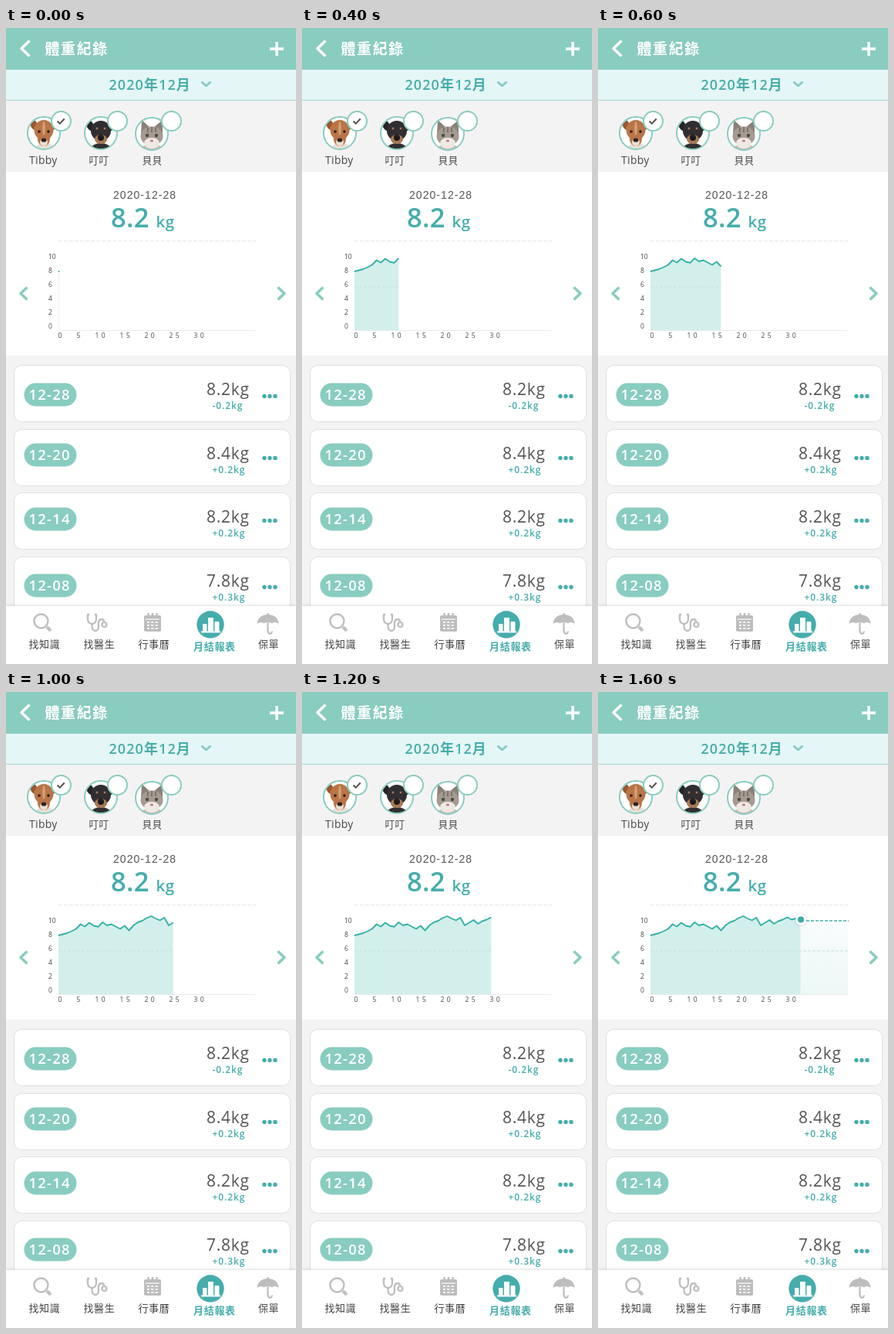
These frames come from a looping animation (376 by 823 pixels, 1.8 s). An HTML page with a canvas:

```html
<!DOCTYPE html>
<html lang="zh-Hant">
<head>
<meta charset="utf-8">
<title>體重紀錄</title>
<style>
html, body { margin: 0; width: 100%; height: 100%; overflow: hidden; background: #fff; }
canvas { display: block; width: 376px; height: 823px; }
</style>
</head>
<body>
<canvas id="stage"></canvas>
<script>
const W = 376, H = 823, LOOP = 1800, STEP = 200;
const MINT = '#89ccc0', TEAL = '#45adab', INK = '#555', GREY = '#bdbdbd', PALE = '#f3f3f3';
const SANS = '"Open Sans", "Noto Sans CJK TC", "Noto Sans CJK", sans-serif';

const canvas = document.getElementById('stage');
const ctx = canvas.getContext('2d');
const ratio = window.devicePixelRatio || 1;
canvas.width = W * ratio;
canvas.height = H * ratio;

// Curve height for each day, and the last day shown at each step
const weights = [315, 313.5, 312, 309.5, 306.5, 300.5, 303.5, 298.5, 302.5, 303.8, 298, 302,
  300.5, 303.5, 306.5, 302.5, 308.5, 302, 298, 296, 292.5, 290, 293, 295.5, 292, 302, 298.5,
  295, 300, 296.5, 294.5, 291.5, 294.5, 293, 294];
const lastDay = [0, 5, 10, 16, 21, 26, 31, 34, 34];
const dayX = day => 68 + day * 5.72;

function text(str, x, y, size, color, spacing = 0, weight = 400, family = SANS) {
  ctx.font = `${weight} ${size}px ${family}`;
  ctx.letterSpacing = spacing + 'px';
  ctx.fillStyle = color;
  ctx.fillText(str, x, y);
}

function rect(x, y, w, h, color) {
  ctx.fillStyle = color;
  ctx.fillRect(x, y, w, h);
}

function paint(fill, stroke, width = 1) {
  if (fill) { ctx.fillStyle = fill; ctx.fill(); }
  if (stroke) { ctx.strokeStyle = stroke; ctx.lineWidth = width; ctx.stroke(); }
}

function round(x, y, w, h, r, fill, stroke, width) {
  ctx.beginPath();
  ctx.roundRect(x, y, w, h, r);
  paint(fill, stroke, width);
}

function oval(x, y, rx, ry, fill, stroke, width, turn = 0) {
  ctx.beginPath();
  ctx.ellipse(x, y, rx, ry, turn, 0, Math.PI * 2);
  paint(fill, stroke, width);
}

const disc = (x, y, r, fill, stroke, width) => oval(x, y, r, r, fill, stroke, width);

function path(d, fill, stroke, width) {
  const shape = new Path2D(d);
  if (fill) { ctx.fillStyle = fill; ctx.fill(shape); }
  if (stroke) { ctx.strokeStyle = stroke; ctx.lineWidth = width; ctx.stroke(shape); }
}

function dashed(x1, x2, y, color, width, dash) {
  ctx.save();
  ctx.setLineDash(dash);
  path(`M${x1} ${y}H${x2}`, null, color, width);
  ctx.restore();
}

function header() {
  rect(0, 0, W, 54, MINT);
  path('M30.5 16.5L20 26.5L30.5 36.5', null, '#fff', 3.6);
  path('M342 27H360M351 18V36', null, '#fff', 3.4);
  text('體重紀錄', 50.5, 33.5, 19, '#fff', 1.6, 600);
  rect(0, 54, W, 39, '#e5f6f6');
  rect(0, 93, W, 1, '#a3d2cb');
  text('2020年12月', 133.5, 80, 18, TEAL, 1.1, 600);
  path('M253.5 69.5L259.5 75L265.5 69.5', null, MINT, 3);
}

function brownDog() {
  oval(51, 157, 13, 8, '#e9dfd6');
  oval(36, 125, 4.5, 8, '#9c5632', null, 0, -0.5);
  oval(62, 125, 4.5, 8, '#9c5632', null, 0, 0.5);
  oval(49, 132, 12.5, 13, '#b97546');
  oval(49, 144, 8, 9, '#b97546');
  oval(49, 148, 5, 5, '#eadccf');
  oval(49, 130, 1.8, 9, '#d3a075');
  disc(43, 134, 1.8, '#2b1a13');
  disc(55, 134, 1.8, '#2b1a13');
  oval(49, 145, 3.4, 2.6, '#2b2422');
}

function blackDog() {
  oval(123, 157, 13, 8, '#302e30');
  oval(109, 126, 4.5, 8, '#252326', null, 0, -0.5);
  oval(137, 126, 4.5, 8, '#252326', null, 0, 0.5);
  oval(123, 133, 13, 13, '#302e30');
  oval(123, 144, 8, 6, '#a87956');
  disc(118, 130, 1.5, '#a27450');
  disc(128, 130, 1.5, '#a27450');
  oval(123, 142, 4, 4, '#1c1a1c');
}

function cat() {
  oval(189, 158, 15, 8, '#c7c0b8');
  path('M175 139L176 119L187 129ZM203 139L203 119L191 129Z', '#8c8176');
  oval(189, 140, 14.5, 12.5, '#a59b90');
  path('M184 129V135M189 128V135M194 129V135', null, '#665f58', 1.2);
  oval(189, 149, 10, 7, '#eee9e4');
  disc(183, 139, 2.2, '#4b4b43');
  disc(195, 139, 2.2, '#4b4b43');
  oval(189, 146, 2.2, 1.5, '#bf8178');
}

function pet(x, y, portrait, name, nameX, badgeX, size) {
  ctx.save();
  disc(x, y, 20.5, '#fff');
  ctx.clip();
  portrait();
  ctx.restore();
  disc(x, y, 21, null, MINT, 2);
  disc(badgeX, 120.5, 12.5, '#fff', MINT, 2);
  text(name, nameX, 175.5, size, '#4a4a4a', 0.3);
}

function pets() {
  rect(0, 94, W, 92, PALE);
  pet(49, 136, brownDog, 'Tibby', 30, 71.5, 14);
  pet(123, 136, blackDog, '叮叮', 107.5, 144.5, 12.7);
  pet(189, 137, cat, '貝貝', 176.5, 214.5, 12.7);
  path('M66.5 120.5L69.8 123.7L75.8 117.5', null, '#555', 2);
}

function trace(day) {
  ctx.beginPath();
  for (let i = 0; i <= day; i++) ctx.lineTo(dayX(i), weights[i]);
}

function forecast() {
  const fade = ctx.createLinearGradient(0, 296, 0, 391);
  fade.addColorStop(0, '#f8fcfc');
  fade.addColorStop(1, '#edf8f6');
  rect(262, 296, 62, 95, fade);
  dashed(270, 325, 296, '#42b3aa', 1.6, [4, 2]);
}

function marker() {
  ctx.save();
  ctx.shadowColor = 'rgba(0,0,0,.16)';
  ctx.shadowBlur = 4 * ratio;
  disc(263, 294.5, 7, '#fff');
  ctx.restore();
  disc(263, 294.5, 4, '#35ada6');
}

function chart(step) {
  const day = lastDay[step], edge = dayX(day), complete = step === lastDay.length - 1;
  rect(0, 186, W, 238, '#fff');
  text('2020-12-28', 139, 220.5, 14, INK, 1.05, 400, '"Liberation Sans", Arial, sans-serif');
  text('8.2', 136, 257.5, 34.5, TEAL, 0.3, 600);
  text('kg', 194.5, 257.5, 20.5, TEAL, 0.6, 600);
  path('M27.5 335.5L19 343.5L27.5 351.5M352.5 335.5L361 343.5L352.5 351.5', null, MINT, 3.6);

  dashed(68, 324, 275.5, '#e6e6e6', 1, [5, 2]);
  rect(68, 391, 256, 1, '#e8eceb');
  rect(68, 315, 1, 76, '#eef3f2');
  for (let i = 0; i <= 5; i++) {
    const label = String(10 - 2 * i);
    text(label, 55, 298.5 + 18 * i, 8.5, '#444');
  }
  for (let i = 0; i <= 6; i++) {
    const x = i < 2 ? 67.5 + 24 * i : 51.5 + 32 * i;
    text(String(5 * i), x, 401, 8.5, '#444', 3.4);
  }

  if (complete) forecast();
  if (day) {
    trace(day);
    ctx.lineTo(edge, 391);
    ctx.lineTo(68, 391);
    ctx.closePath();
    paint('#d2efeb');
    dashed(68, complete ? 324 : edge, 335, '#c3e2dd', 1, [4, 2]);
    trace(day);
    paint(null, '#35b0a6', 1.9);
  } else {
    disc(68.5, 315, 1, '#35b0a6');
  }
  if (step >= 7) marker();
}

function card(top, pillY, dotsY, date, weight, change) {
  round(10.5, top + 0.5, 358, 73, 10, '#fff', '#dedede');
  round(23.5, pillY - 15, 68, 30, 15, MINT);
  text(date, 29.5, pillY + 6.5, 18.5, '#fff', 1.2, 600);
  text(weight, 260, top + 39, 21, INK, 0.7);
  text(change, 267.5, top + 56.5, 12, TEAL, 0.9, 600);
  for (const x of [335, 342, 349]) disc(x, dotsY, 2.7, TEAL);
}

function cards() {
  rect(0, 424, W, 324, PALE);
  card(436, 474.5, 476.5, '12-28', '8.2kg', '-0.2kg');
  card(519, 552.5, 556.5, '12-20', '8.4kg', '+0.2kg');
  card(601, 635.5, 637.5, '12-14', '8.2kg', '+0.2kg');
  card(684, 721.5, 723.5, '12-08', '7.8kg', '+0.3kg');
}

function calendarIcon() {
  round(179, 760, 22, 21, 2, GREY);
  path('M184.5 757V763M190 757V763M195.5 757V763', null, GREY, 2.2);
  rect(181, 764.5, 18, 1.2, '#fff');
  for (let i = 0; i < 9; i++) rect(183 + i % 3 * 5.3, 768 + Math.floor(i / 3) * 4, 3, 2, '#fff');
}

function navigation() {
  ctx.save();
  ctx.shadowColor = 'rgba(0,0,0,.22)';
  ctx.shadowBlur = 4 * ratio;
  rect(0, 748, W, 75, '#fff');
  ctx.restore();

  disc(45.5, 767.5, 9, null, GREY, 2.4);
  path('M53 775L58 780', null, GREY, 4);

  path('M108 759H106V765C106 773 117 773 117 765V759H115M111.5 771V774C111.5 782 120 782 120 774V770C120 764 127 764 127 768',
    null, GREY, 2.3);
  disc(127.5, 772, 3, '#fff', GREY, 2.2);

  calendarIcon();

  disc(265, 772, 17.7, TEAL);
  round(255, 771, 5.5, 10, 1, '#fff');
  round(262, 763, 7, 18, 1, '#fff');
  round(270.5, 768, 6, 13, 1, '#fff');
  path('M253 781.5H278', null, '#fff', 2);

  path('M325.5 771C326 763 332 759 339.5 759S353 763 353.5 771Q349 767.5 345 770.5Q339.5 767 334 770.5Q330 767.5 325.5 771Z', GREY);
  path('M339.5 757V780C339.5 785 345 785 345 780.5', null, GREY, 2.2);

  text('找知識', 29.5, 802, 13, '#444', 0.6);
  text('找醫生', 100.5, 802, 13, '#444', 0.6);
  text('行事曆', 171.5, 802, 13, '#444', 0.6);
  text('月結報表', 243, 804.5, 13, TEAL, 0.7, 600);
  text('保單', 327, 802, 13, '#444', 0.6);
}

function frame(now) {
  const step = Math.floor(now % LOOP / STEP);
  ctx.setTransform(ratio, 0, 0, ratio, 0, 0);
  ctx.lineCap = 'butt';
  ctx.lineJoin = 'round';
  header();
  pets();
  chart(step);
  cards();
  navigation();
}

const start = performance.now();
function tick() {
  frame(performance.now() - start);
  requestAnimationFrame(tick);
}
tick();
</script>
</body>
</html>
```
